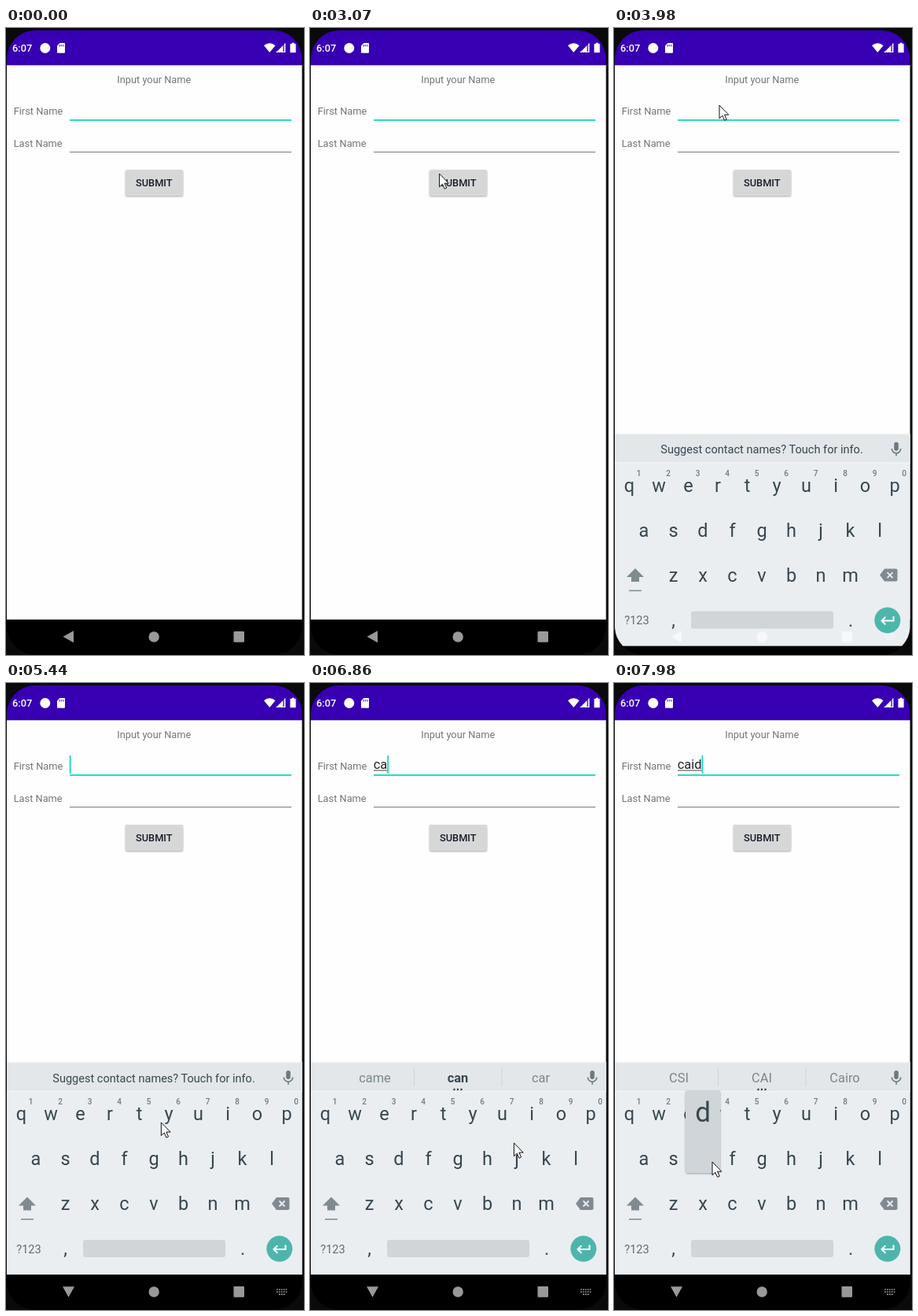
An HTML page that plays this animation: 379x796 px, repeating every 8000 ms.

```html
<!DOCTYPE html>
<html lang="en">
<head>
<meta charset="utf-8">
<title>Name form</title>
<style>
  html, body { margin: 0; height: 100%; overflow: hidden; background: #0a0a0b; }
  svg { display: block; width: 100vw; height: 100vh; font-family: Roboto, sans-serif; }
  text { white-space: pre; }
  .label { font-size: 12.8px; fill: #757575; }
  .medium { font-size: 12.8px; font-weight: 500; }
  .mid { text-anchor: middle; }
  .key { font-size: 23.5px; fill: #37474f; text-anchor: middle; }
  .hint { font-size: 10px; font-weight: 500; fill: #6f7b81; text-anchor: middle; }
  .word { font-size: 16.4px; fill: #7b868c; text-anchor: middle; }
  .bold { font-weight: 700; fill: #37474f; }
</style>
</head>
<body>
<svg viewBox="0 0 379 796">
  <defs>
    <clipPath id="screen"><rect x="1" y="3" width="375.5" height="792.5" rx="36"/></clipPath>
    <filter id="shadow" x="-20%" y="-20%" width="140%" height="140%">
      <feDropShadow dx="0" dy="1" stdDeviation="1" flood-opacity=".35"/>
    </filter>
  </defs>
  <g clip-path="url(#screen)">
    <rect width="379" height="796" fill="#000"/>
    <rect y="47" width="379" height="704" fill="#fefefe"/>

    <!-- Status bar -->
    <rect width="379" height="47.3" fill="#3700b3"/>
    <g fill="#fff">
      <text class="medium" x="8" y="30">6:07</text>
      <circle cx="49.8" cy="25.5" r="6.5"/>
      <path d="M68.6 19H74q1 0 1 1V30.700q0 1-1 1H66q-1 0-1-1V22.600Z"/>
      <path d="M328 22.300Q335.300 16.300 342.600 22.300L335.300 31Z"/>
      <path d="M343.500 31L355.300 19V31Z" opacity=".35"/>
      <path d="M343.500 31L352 22.400V31ZM354 20.300L355.300 19V31H343.500V30H354Z"/>
      <path d="M363.600 18.800h3v1.200h2v11.300h-7.200V20h2.200Z"/>
    </g>
    <path d="M68.500 21v2.500M70.700 21v2.500M72.900 21v2.500" stroke="#3700b3" stroke-width=".9"/>

    <!-- Form -->
    <text class="label mid" x="188.300" y="70">Input your Name</text>
    <text class="label" x="9.700" y="109.500">First Name</text>
    <text class="label" x="9.700" y="150.500">Last Name</text>
    <rect x="81" y="116" width="282" height="1.900" fill="#1fd8c2"/>
    <rect x="81" y="157" width="282" height="1" fill="#7b7b7b"/>
    <rect x="152" y="180" width="73" height="33" rx="1.800" fill="#d6d7d7" filter="url(#shadow)"/>
    <text class="medium mid" x="188.300" y="201.300" fill="#1c1a26">SUBMIT</text>
    <text id="typed" x="80.700" y="109" font-size="16.400" fill="#212121"></text>
    <rect id="composing" x="81" y="110.500" height="1" fill="#444"/>
    <rect id="caret" y="92" width="1.900" height="23" fill="#1fd8c2"/>

    <!-- Keyboard -->
    <g id="keyboard">
      <rect y="751" width="379" height="350" fill="#000"/>
      <rect y="481" width="379" height="2" fill="#f1f3f4"/>
      <rect y="482.500" width="379" height="268.500" fill="#eaeef1"/>
      <rect y="482.500" width="379" height="35.500" fill="#e3e7e9"/>
      <rect y="518" width="379" height="1" fill="#f5f7f8"/>
      <text id="notice" class="mid" x="188" y="506.500" font-size="14.560" fill="#37474f">Suggest contact names? Touch for info.</text>
      <g id="suggestions">
        <path d="M132.500 490v22M244 490v22" stroke="#ccd2d5"/>
        <g fill="#37474f"><circle cx="183.500" cy="516" r="1.300"/><circle cx="188" cy="516" r="1.300"/><circle cx="192.500" cy="516" r="1.300"/></g>
        <text class="word" x="82.500" y="507"></text>
        <text class="word" x="188" y="507"></text>
        <text class="word" x="293.500" y="507"></text>
      </g>
      <g fill="none" stroke="#6d787d">
        <path d="M359 494.800v5.500" stroke-width="5.500" stroke-linecap="round"/>
        <path d="M353.300 500.500a5.700 5.700 0 0 0 11.400 0M359 506v3.700" stroke-width="1.600"/>
      </g>
      <g id="keys"></g>
      <g fill="#808b8f">
        <path d="M27 652.500L38 663.500H32V669.500H22V663.500H16Z"/>
        <rect x="19" y="680" width="16" height="1.500"/>
        <path d="M344 653H358.500q2 0 2 2V667q0 2-2 2H344L338 661Z"/>
      </g>
      <path d="M347.500 657.500l7 7m0-7l-7 7" stroke="#eaeef1" stroke-width="1.800"/>
      <text class="mid" x="29" y="723.500" font-size="14.600" fill="#5f6c73">?123</text>
      <rect x="98" y="707" width="181" height="22" rx="3" fill="#d0d5d8"/>
      <circle cx="347.800" cy="718.300" r="16.500" fill="#4db6ac"/>
      <path d="M355.500 713.500v5.500H340.500m4.800-4.800l-4.800 4.800l4.800 4.800" fill="none" stroke="#fff" stroke-width="2"/>
      <g id="popup">
        <rect x="-22" y="-95" width="44" height="105" rx="3" fill="#cfd5d8" filter="url(#shadow)"/>
        <text class="mid" y="-55" font-size="35" fill="#37474f"></text>
      </g>
    </g>

    <!-- Navigation bar -->
    <g fill="#fff" opacity=".6">
      <path id="back" d="M-7 0L6.500-7.500V7.500Z"/>
      <circle cx="188.200" cy="773" r="6.700"/>
      <rect x="289.500" y="766" width="13.500" height="13.700" rx="1"/>
      <path id="imeIcon" d="M344 770h14M344 773h14M347 776.200h8" stroke="#fff" stroke-width="1.700" stroke-dasharray="1.800 1.100"/>
    </g>
  </g>
  <path id="pointer" d="M0 0V16.800L3.900 13.200L6.600 19.300L9.200 18.100L6.500 12.200H11.800Z" fill="#fff" stroke="#111" stroke-width="1"/>
</svg>
<script>
const LOOP = 8000;
const $ = id => document.getElementById(id);
const show = (el, on) => el.setAttribute('visibility', on ? 'inherit' : 'hidden');
const move = (el, x, y, extra = '') => el.setAttribute('transform', `translate(${x} ${y}) ${extra}`);
const clamp01 = v => Math.min(1, Math.max(0, v));

// Keys, with the middle and baseline of each
const keyAt = {};
function addText(cls, x, y, content) {
  const el = document.createElementNS('http://www.w3.org/2000/svg', 'text');
  el.setAttribute('class', cls);
  el.setAttribute('x', x);
  el.setAttribute('y', y);
  el.textContent = content;
  $('keys').append(el);
}
[['qwertyuiop', 19.5], ['asdfghjkl', 38], ['zxcvbnm', 75.5]].forEach(([letters, left], row) => {
  [...letters].forEach((letter, i) => {
    const x = left + 37.5 * i, y = 555 + 57 * row;
    keyAt[letter] = [x, y];
    addText('key', x, y, letter);
    if (row === 0) addText('hint', x + 12, 535, (i + 1) % 10);
  });
});
addText('key', 75.5, 726, ',');
addText('key', 301, 726, '.');

// Pointer tip: time, x, y
const path = [
  [100, 375, 900], [130, 362, 796], [750, 287, 482], [2880, 287, 482],
  [3070, 165, 186], [3260, 126, 84], [3560, 134, 98], [5280, 134, 98],
  [5440, 197, 556], [5560, 236, 625], [5820, 147, 655], [6090, 147, 655],
  [6290, 36, 606], [6470, 36, 606], [6860, 259, 584], [7050, 279, 553],
  [7250, 279, 553], [7600, 125, 608], [LOOP, 125, 608]
];
const taps = [
  { key: 'c', down: 5890, up: 5980, gone: 6070 },
  { key: 'a', down: 6310, up: 6400, gone: 6480 },
  { key: 'i', down: 7090, up: 7180, gone: 7260 },
  { key: 'd', down: 7810, up: 7930, gone: LOOP }
];
const suggestionSets = [
  { at: 6500, words: ['came', 'can', 'car'], bold: true },
  { at: 7290, words: ['CSI', 'CAI', 'Cairo'], bold: false }
];

// Speed at a point is zero where the pointer rests
function slope(i, axis) {
  const a = path[i - 1], b = path[i], c = path[i + 1];
  const rests = n => !n || (n[1] === b[1] && n[2] === b[2]);
  return rests(a) || rests(c) ? 0 : (c[axis] - a[axis]) / (c[0] - a[0]);
}

function pointerAt(t) {
  const i = path.findIndex(p => p[0] > t) - 1;
  if (i < 0) return path[0].slice(1);
  const a = path[i], b = path[i + 1], span = b[0] - a[0], u = (t - a[0]) / span;
  return [1, 2].map(axis =>
    a[axis] + (b[axis] - a[axis]) * u * u * (3 - 2 * u)
    + span * u * (1 - u) * (slope(i, axis) * (1 - u) - slope(i + 1, axis) * u));
}

function caretOn(t, lastTyped) {
  if (lastTyped) return Math.floor((t - lastTyped.up) / 500) % 2 === 0;
  if (t >= 3580 && t < 4080) return false;
  const start = t < 3580 ? 150 : 4080;
  return t >= start && Math.floor((t - start) / 500) % 2 === 0;
}

function render(t) {
  const typedTaps = taps.filter(tap => t >= tap.up);
  const typed = $('typed');
  typed.textContent = typedTaps.map(tap => tap.key).join('');
  const width = typedTaps.length ? typed.getComputedTextLength() : 0;
  $('composing').setAttribute('width', width);
  $('caret').setAttribute('x', 80.7 + width);
  show($('caret'), caretOn(t, typedTaps.at(-1)));

  const rise = clamp01((t - 3850) / 330);
  move($('keyboard'), 0, 314 * (1 - rise) ** 4.42);
  show($('keyboard'), t >= 3850);
  show($('imeIcon'), t >= 3710);
  move($('back'), 79.5, 772.7, `rotate(${-90 * clamp01((t - 4000) / 160)})`);

  const set = suggestionSets.findLast(s => t >= s.at);
  show($('notice'), !set);
  show($('suggestions'), set);
  $('suggestions').querySelectorAll('text').forEach((el, i) => {
    el.textContent = set ? set.words[i] : '';
    el.classList.toggle('bold', Boolean(set && set.bold && i === 1));
  });

  const pressed = taps.find(tap => t >= tap.down && t < tap.gone);
  show($('popup'), pressed);
  if (pressed) {
    move($('popup'), ...keyAt[pressed.key]);
    $('popup').querySelector('text').textContent = pressed.key;
  }
  move($('pointer'), ...pointerAt(t));
}

const start = performance.now();
function frame() {
  render((performance.now() - start) % LOOP);
  requestAnimationFrame(frame);
}
frame();
</script>
</body>
</html>
```
